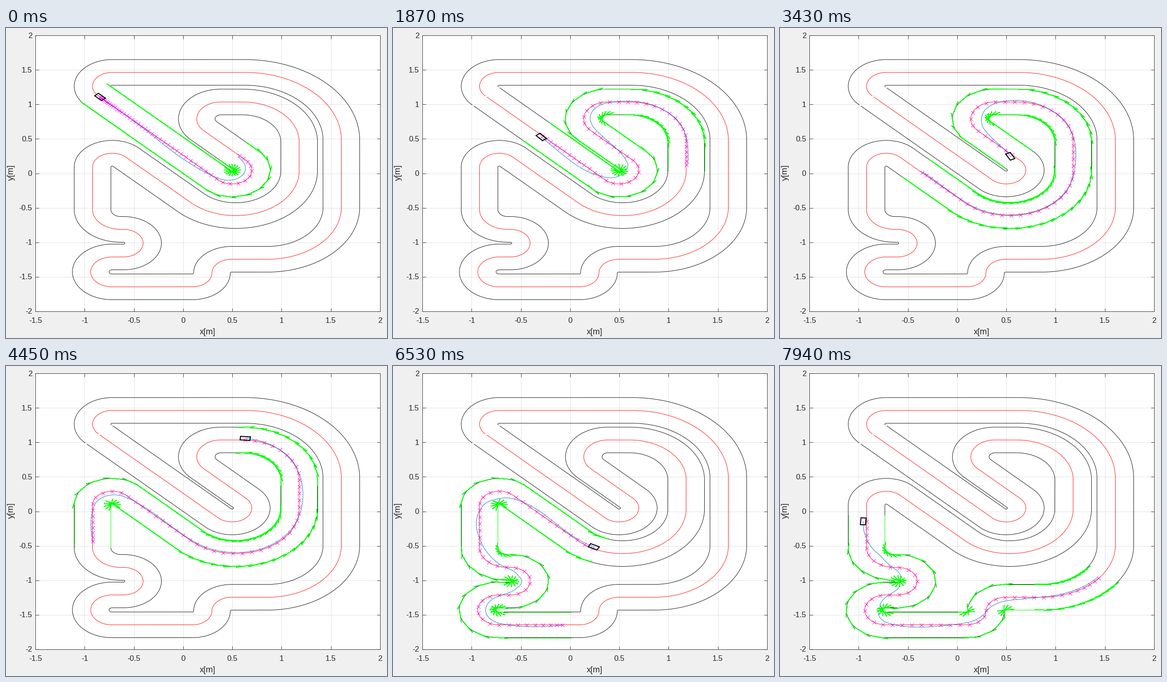
Recreate the animation shown at these times as a matplotlib script. Size 830 px wide and 675 px high, loop 8 s.

```python
import numpy as np
import matplotlib.pyplot as plt
from matplotlib.animation import FuncAnimation
from matplotlib.collections import LineCollection
from matplotlib.transforms import Affine2D

W, H, DPI = 830, 675, 100
FRAMES, INTERVAL = 100, 80
LEFT, RIGHT, TOP, BOTTOM = 64, 815, 16, 617
INK = (0.15, 0.15, 0.15)
THIN = 0.65

DS = 0.004            # arc length step of the track grid
HALF_WIDTH = 0.186    # track half width
STEPS = 50            # points on the planning horizon
TICK = 0.085          # half length of a border tangent
SMOOTH = 0.4          # length over which the driven line rounds off bends
TOP_SPEED = 0.1013    # metres per frame

# Track as a path walk: straight length, bend radius, turn in degrees
START = (-0.847, 1.1028)
TRACK = [
    (1.698, 0.200, 180), (0.606, 0.2448, -135), (0.219, 0.5756, -90),
    (0.427, 0.6443, -135), (0.928, 0.200, 135), (0.618, 0.285, 90),
    (0.028, 0.200, -180), (0.115, 0.2166, 180), (0.814, 0.200, 90),
    (0.000, 0.200, -90), (0.364, 0.750, 90), (0.979, 0.979, 90),
    (1.347, 0.200, 135),
]


def build_track():
    x, y = START
    head = -np.pi / 4
    xs, ys, heads = [[x]], [[y]], [[head]]
    for straight, r, turn in TRACK:
        x += straight * np.cos(head)
        y += straight * np.sin(head)
        side = np.sign(turn) * r
        h = head + np.radians(np.linspace(0, turn, 91))
        xs.append(x + side * (np.sin(h) - np.sin(head)))
        ys.append(y - side * (np.cos(h) - np.cos(head)))
        heads.append(h)
        x, y, head = xs[-1][-1], ys[-1][-1], h[-1]
    x, y, head = (np.concatenate(v) for v in (xs, ys, heads))
    s = np.concatenate([[0], np.cumsum(np.hypot(np.diff(x), np.diff(y)))])
    grid = np.arange(0, s[-1], DS)
    return [grid] + [np.interp(grid, s, v) for v in (x, y, head)]


S, CX, CY, HEAD = build_track()
CURVE = np.gradient(HEAD, S)


def racing_offset():
    """Offset that trades steering effort against distance from the centre."""
    u = np.arange(-2, 2 + DS / 2, DS) / SMOOTH
    kernel = SMOOTH / 4 * np.exp(-abs(u)) * (np.cos(u) - np.sin(abs(u)))
    pad = len(u) // 2
    e = np.convolve(np.pad(CURVE, pad), kernel, "valid") * DS
    return np.clip(e, -0.17, 0.17)


OFFSET = racing_offset()


def at(s, offset):
    x, y, h = (np.interp(s, S, v) for v in (CX, CY, HEAD))
    return x - offset * np.sin(h), y + offset * np.cos(h), h


def speed(f):
    return np.minimum(0.006 + 0.0025 * f, TOP_SPEED)


def travelled(f):
    t = np.linspace(0, f, 200)
    return np.trapezoid(speed(t), t) if hasattr(np, "trapezoid") else np.trapz(speed(t), t)


def horizon(f, start):
    """Arc lengths of the planned steps: speed up, then ease off at the end."""
    i = np.arange(STEPS)
    ease = np.clip((i / STEPS - 0.8) / 0.2, 0, 1)
    step = np.minimum(speed(f) + 0.002 * i, 0.1) * (1 - 0.5 * ease**2)
    total = np.concatenate([[0], np.cumsum(step)])
    length = min(2.42 + 0.076 * f, 4.75)
    return start + length * total / total[-1]


def planned_line(s0, s1):
    s = np.linspace(s0, s1, 160)
    u = np.clip(((s - s0) / (s1 - s0) - 0.33) / 0.32, 0, 1)
    far = u * u * (3 - 2 * u)
    return at(s, (1 - 0.5 * far) * np.interp(s, S, OFFSET))[:2]


def border_tangents(s):
    skew = np.clip(0.08 * np.interp(s, S, CURVE), -0.12, 0.12)
    segments = []
    for side in (1, -1):
        x, y, h = at(s, side * HALF_WIDTH)
        dx, dy = TICK * np.cos(h - skew), TICK * np.sin(h - skew)
        ends = [np.column_stack([x + k * dx, y + k * dy]) for k in (-1, 1)]
        segments.extend(np.stack(ends, axis=1))
    return segments


def car_outline(s0):
    s = np.array([max(s0 - 0.03, 0), s0, s0 + 0.03])
    x, y, _ = at(s, np.interp(s, S, OFFSET))
    a = np.arctan2(y[2] - y[0], x[2] - x[0])
    u = 0.05 * np.array([1, 1, -1, -1, 1])
    v = 0.026 * np.array([1, -1, -1, 1, 1])
    return (x[1] + u * np.cos(a) - v * np.sin(a),
            y[1] + u * np.sin(a) + v * np.cos(a))


fig = plt.figure(figsize=(W / DPI, H / DPI), dpi=DPI, facecolor=(240 / 255,) * 3)
ax = fig.add_axes([LEFT / W, 1 - BOTTOM / H, (RIGHT - LEFT) / W, (BOTTOM - TOP) / H])
ax.set(xlim=(-1.5, 2), ylim=(-2, 2),
       xticks=np.arange(-1.5, 2.1, 0.5), yticks=np.arange(-2, 2.1, 0.5))
ax.tick_params(direction="in", top=True, right=True, length=5.4, width=THIN,
               color=INK, labelbottom=False, labelleft=False)
ax.grid(color=INK, alpha=0.15, linewidth=THIN)
ax.set_axisbelow(True)
for spine in ax.spines.values():
    spine.set(color=INK, linewidth=THIN)


def label(px, py, text, size=12, **kw):
    fig.text(px / W, 1 - py / H, text, fontsize=size, color=INK,
             family="Liberation Sans", **kw)


for v in ax.get_xticks():
    label(LEFT + (v + 1.5) * (RIGHT - LEFT) / 3.5, 642, f"{v:g}",
          ha="center", va="baseline")
for v in ax.get_yticks():
    label(57, TOP + (2 - v) * (BOTTOM - TOP) / 4 + 5.5, f"{v:g}",
          ha="right", va="baseline")
label(439.5, 667, "x[m]", 13.2, ha="center", va="baseline")
label(11.5, 315, "y[m]", 13.2, ha="center", va="center", rotation=90)
fig.add_artist(plt.Line2D([0, 1], [0.5 / H] * 2, color="0.68", linewidth=0.72))

# Curves are not snapped, so move them onto pixel centres like the axes lines
centred = ax.transData + Affine2D().translate(0.5, 0.5)


def curve(x=(), y=(), fmt="-", **kw):
    kw.setdefault("linewidth", THIN)
    return ax.plot(x, y, fmt, transform=centred, **kw)[0]


for side in (1, -1):
    curve(*at(S, side * HALF_WIDTH)[:2], color="black")
curve(CX, CY, color="red")

plan = curve(color=(0, 114 / 255, 189 / 255))
tangents = LineCollection([], colors=[(0, 1, 0)], linewidths=0.72, zorder=2,
                          antialiaseds=False, transform=centred)
ax.add_collection(tangents, autolim=False)
marks = curve(fmt="x", color=(1, 0, 1), markersize=5.6, markeredgewidth=THIN)
car = curve(color="black", linewidth=1.5, solid_joinstyle="miter")


def draw(f):
    s0 = travelled(f)
    s = horizon(f, s0)
    plan.set_data(*planned_line(s0, s[-1]))
    tangents.set_segments(border_tangents(s))
    marks.set_data(*at(s, 0)[:2])
    car.set_data(*car_outline(s0))
    return plan, tangents, marks, car


anim = FuncAnimation(fig, draw, frames=FRAMES, interval=INTERVAL,
                     init_func=lambda: draw(0), repeat=True, repeat_delay=0)
plt.show()
```
